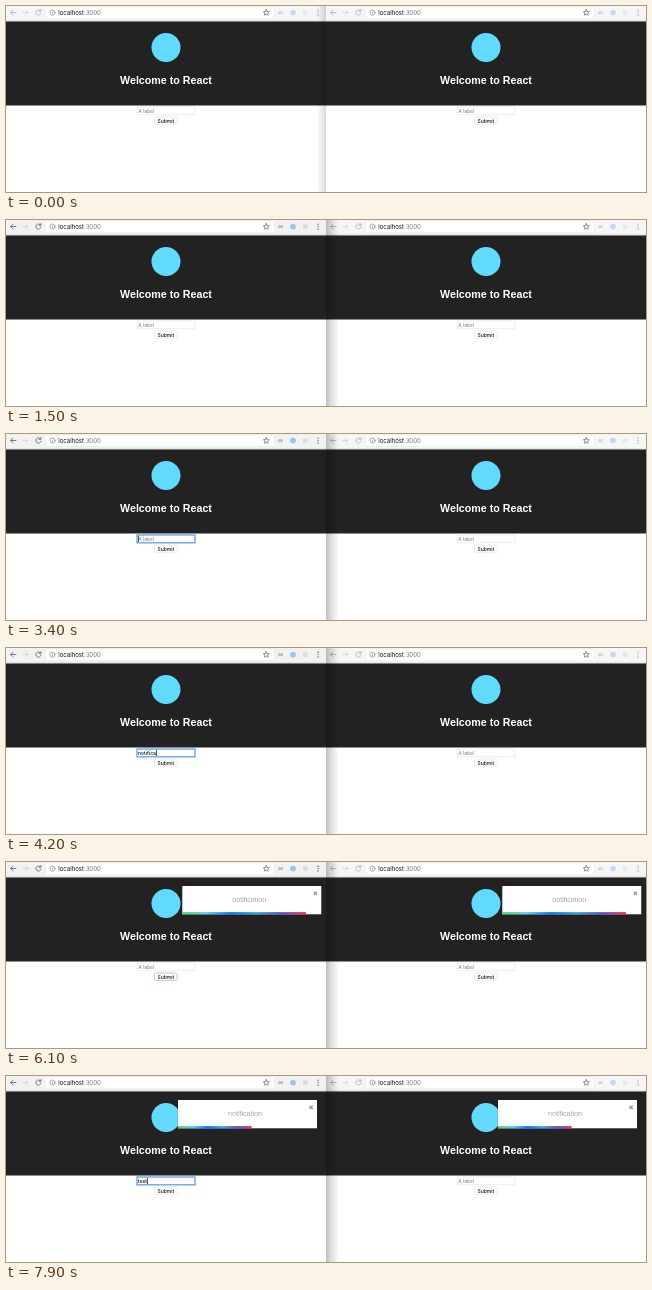
An HTML page that plays this animation: 640 by 186 pixels, repeating every 8000 ms.

```html
<!DOCTYPE html>
<html lang="en">
<head>
<meta charset="utf-8">
<title>Label form</title>
<style>
html, body { margin: 0; width: 100%; height: 100%; overflow: hidden; background: #fff; }
#stage { display: block; width: 640px; height: 186px; }
text { white-space: pre; }
.ui { font-family: Inter, "Open Sans", sans-serif; }
.page { font-family: "Liberation Sans", Arial, sans-serif; }
.line { fill: none; stroke-width: .8; stroke-linecap: round; stroke-linejoin: round; }
.strong { stroke: #adadad; }
.active .strong { stroke: #5c5c5c; }
.weak { stroke: #d2d2d2; }
.dots { fill: #a2a2a2; }
.active .dots { fill: #5c5c5c; }
.bar { fill: #f6f6f6; }
.active .bar { fill: #f2f2f2; }
.extras { opacity: .55; }
.active .extras { opacity: 1; }
</style>
</head>
<body>
<svg id="stage" viewBox="0 0 640 186">
  <defs>
    <linearGradient id="rainbow">
      <stop offset="0" stop-color="#4cd964"/>
      <stop offset=".2" stop-color="#5ac8fa"/>
      <stop offset=".4" stop-color="#007aff"/>
      <stop offset=".6" stop-color="#34aadc"/>
      <stop offset=".8" stop-color="#5856d6"/>
      <stop offset="1" stop-color="#ff2d55"/>
    </linearGradient>
    <linearGradient id="shadeLeft">
      <stop offset="0" stop-opacity="0"/>
      <stop offset="1" stop-opacity=".15"/>
    </linearGradient>
    <linearGradient id="shadeRight">
      <stop offset="0" stop-opacity=".25"/>
      <stop offset=".4" stop-opacity=".13"/>
      <stop offset="1" stop-opacity="0"/>
    </linearGradient>
  </defs>
  <g id="windows"></g>
  <rect id="behind" x="311" width="9" height="186" fill="url(#shadeLeft)"/>
  <rect id="front" x="320" width="13" height="186" fill="url(#shadeRight)"/>
</svg>
<script>
const LOOP = 8000;
const ACTIVATE = 1200, FOCUS = 2200, TAB = 5000, SUBMIT = 5550, REFOCUS = 6600;
const TOAST_LIFE = 5000, ENTER = 750, BAR = 139;

// [start, ms per letter, text]
const TYPING = [[3450, 100, "notification"], [7400, 140, "test"]];
// [progress, offset x] of the toast's bouncing entrance
const BOUNCE = [[0, 1302], [.6, -10.9], [.75, 4.3], [.9, -2.2], [1, 0]];
// [stroke, stroke-width] of the form controls
const FIELD = [["#e2e2e2", .6], ["#6ba5ee", 1.4]];
const BUTTON = [["#e2e2e2", .6], ["#a3bbd8", .8]];

const $ = id => document.getElementById(id);

const windowMarkup = (id, x) => `
<svg id="${id}" x="${x}" width="320" height="186">
  <rect width="320" height="186" fill="#fff"/>
  <rect class="bar" width="320" height="15.5"/>
  <rect x="39.3" y="1" width="229" height="11.4" rx="1.5" fill="#fff" stroke="#e0e0e0" stroke-width=".5"/>
  <path d="M0 15.1H320" stroke="#c4c4c4" stroke-width=".8"/>
  <path class="line strong" d="M9.8 6.5H4.8M7 4.2L4.7 6.5L7 8.8"/>
  <path class="line weak" d="M16.8 6.5H21.8M19.6 4.2L21.9 6.5L19.6 8.8"/>
  <path class="line strong" d="M34.6 5A2.6 2.6 0 1 0 35 7.2M35 3.5V5.3H33.2"/>
  <circle class="line" cx="46.5" cy="6.6" r="2.6" stroke="#777" style="stroke-width:.6"/>
  <path d="M46.5 6.2V8.1M46.5 4.9V5.4" stroke="#777" stroke-width=".7"/>
  <text class="ui" x="52.3" y="8.9" font-size="6" fill="#111">localhost<tspan fill="#777">:3000</tspan></text>
  <path class="line" d="M260.3 3.5L261.1 5.5L263.3 5.7L261.6 7.1L262.2 9.3L260.3 8.1L258.4 9.3L259 7.1L257.3 5.7L259.5 5.5Z" stroke="#666" style="stroke-width:.7"/>
  <g class="extras">
    <rect x="272" y="5.2" width="5" height="3" fill="#c2c2c2"/>
    <circle cx="287" cy="6.6" r="2.9" fill="#9cc4ec"/>
    <rect x="297" y="4.5" width="4.4" height="4.4" fill="#dcdcdc"/>
  </g>
  <g class="dots"><circle cx="312" cy="4.2" r=".7"/><circle cx="312" cy="6.6" r=".7"/><circle cx="312" cy="9" r=".7"/></g>

  <rect y="15.5" width="320" height="84" fill="#222"/>
  <circle cx="160" cy="41.5" r="14.5" fill="#61dafb"/>
  <text class="page" x="160" y="77.8" font-size="10.7" font-weight="700" fill="#fff" text-anchor="middle">Welcome to React</text>

  <rect class="field" x="131" y="101" width="58" height="7.8" fill="#fff"/>
  <text class="hint ui" x="132.2" y="106.8" font-size="5" fill="#7d7d7d">A label</text>
  <text class="value ui" x="132" y="106.8" font-size="5" font-weight="500" fill="#111"></text>
  <rect class="caret" y="101.8" width=".7" height="6.2" fill="#111"/>
  <rect class="button" x="148.5" y="111" width="22.6" height="7.4" rx="1.3" fill="#fff"/>
  <text class="ui" x="159.8" y="116.5" font-size="5" font-weight="500" fill="#111" text-anchor="middle">Submit</text>

  <g class="toast">
    <rect x="171.6" y="23.8" width="140.2" height="29.2" rx=".5" opacity=".18"/>
    <rect x="172" y="24" width="${BAR}" height="28.3" fill="#fff"/>
    <text class="page" x="239" y="40.3" font-size="7.1" fill="#a6a6a6" text-anchor="middle">notification</text>
    <path d="M303.5 29.8L306.7 33M306.7 29.8L303.5 33" stroke="#9a9a9a" stroke-width="1.3"/>
    <rect class="progress" x="172" y="50.1" height="2.2" fill="url(#rainbow)"/>
  </g>
</svg>`;

$("windows").innerHTML = windowMarkup("left", 0) + windowMarkup("right", 320);
const part = (id, name) => document.querySelector(`#${id} .${name}`);
const parts = id => Object.fromEntries(
  ["field", "hint", "value", "caret", "button", "toast", "progress"].map(n => [n, part(id, n)]));
const left = parts("left"), right = parts("right");

const show = (el, on) => el.setAttribute("visibility", on ? "visible" : "hidden");
const set = (el, attrs) => { for (const k in attrs) el.setAttribute(k, attrs[k]); };
const easeOut = t => 1 - (1 - t) ** 3;

function typed(t) {
  const [start, step, text] = TYPING[t < SUBMIT ? 0 : 1];
  return text.slice(0, Math.max(0, Math.floor((t - start) / step) + 1));
}

function bounceX(p) {
  if (p >= 1) return 0;
  const i = BOUNCE.findIndex(([at]) => at > p);
  const [p0, x0] = BOUNCE[i - 1], [p1, x1] = BOUNCE[i];
  return x0 + (x1 - x0) * easeOut((p - p0) / (p1 - p0));
}

function outline(el, styles, focused) {
  const [stroke, width] = styles[focused ? 1 : 0];
  set(el, { stroke, "stroke-width": width });
}

function drawToast({ toast, progress }, t) {
  const age = t - SUBMIT;
  show(toast, age >= 0);
  if (age < 0) return;
  const p = age / ENTER;
  set(toast, {
    transform: `translate(${bounceX(p)} 0)`,
    opacity: easeOut(Math.min(1, p / .6))
  });
  set(progress, { width: BAR * Math.max(0, 1 - age / TOAST_LIFE) });
}

function drawForm(t) {
  const text = typed(t);
  const focused = (t >= FOCUS && t < TAB) || t >= REFOCUS;
  left.value.textContent = text;
  show(left.hint, !text);
  outline(left.field, FIELD, focused);
  outline(left.button, BUTTON, t >= TAB && t < REFOCUS);

  const since = t - (t < TAB ? FOCUS : REFOCUS);
  const typing = TYPING.some(([s, step, w]) => t >= s && t < s + step * w.length + 400);
  show(left.caret, focused && (typing || since % 1000 < 500));
  set(left.caret, { x: 132 + (text ? left.value.getComputedTextLength() + .2 : 0) });
}

function draw(t) {
  const active = t >= ACTIVATE;
  $("left").classList.toggle("active", active);
  show($("behind"), !active);
  show($("front"), active);
  drawForm(t);
  drawToast(left, t);
  drawToast(right, t);
}

outline(right.field, FIELD, false);
outline(right.button, BUTTON, false);
show(right.caret, false);

const began = performance.now();
function tick() {
  draw((performance.now() - began) % LOOP);
  requestAnimationFrame(tick);
}
tick();
</script>
</body>
</html>
```
